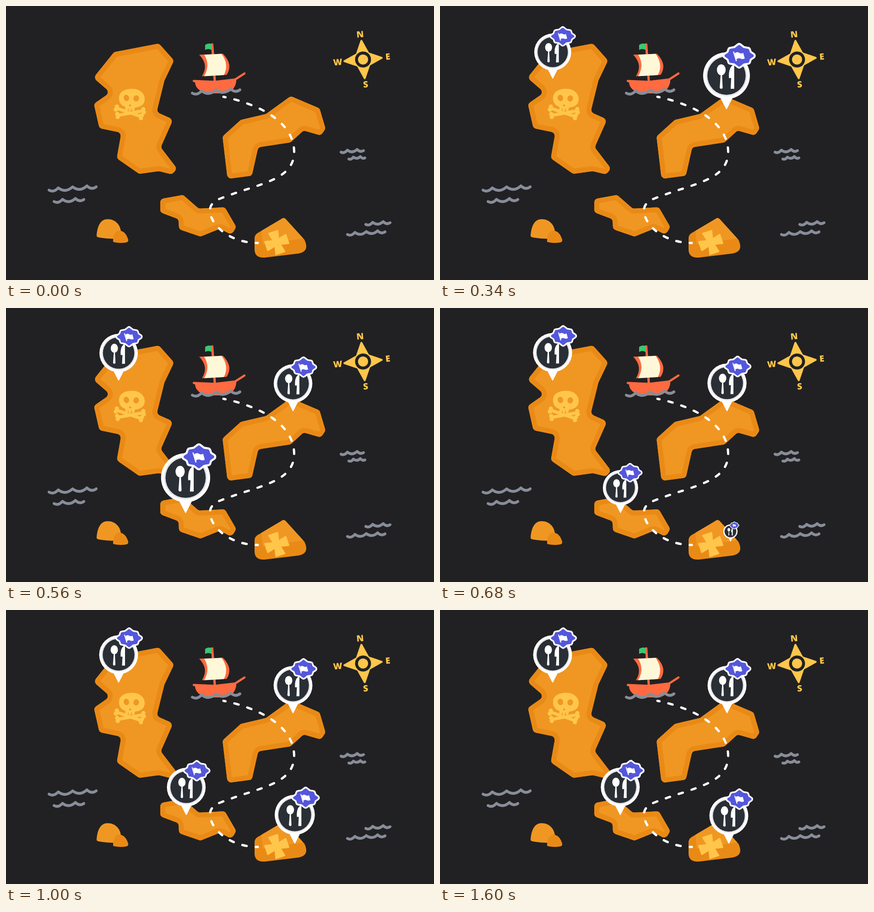
These frames come from a looping animation (935 px wide and 599 px high, 2400 ms). An HTML page with a canvas:

```html
<!DOCTYPE html>
<html lang="en">
<head>
<meta charset="utf-8">
<title>Treasure map</title>
<style>
  html, body { margin: 0; width: 100%; height: 100%; overflow: hidden; background: #212123; }
  canvas { display: block; width: 935px; height: 599px; }
  svg { position: absolute; width: 0; height: 0; }
</style>
</head>
<body>
<canvas id="stage" width="935" height="599"></canvas>
<svg><path id="route" d="M475 198.5 C537 211 628 246 629.5 318 C630 382 551 388 468 421 C453 427 444 436 446 450 C448 480 490 518 550 518"/></svg>
<script>
const W = 935, H = 599, LOOP = 2400, STEP = 20, TAU = Math.PI * 2;
const BG = '#212123', EDGE = '#ea8a16', LAND = '#f09723', GOLD = '#ffc64b', SEA = '#878d99',
      RED = '#ff6a40', CREAM = '#fff8d8', GREEN = '#3cc671', BADGE = '#5457db', PLATE = '#2a2f36';

const stage = document.getElementById('stage').getContext('2d');
let ctx = stage;

const asPath = d => typeof d === 'string' ? new Path2D(d) : d;

function fill(d, color) {
  ctx.fillStyle = color;
  ctx.fill(asPath(d));
}

function line(d, color, width) {
  ctx.strokeStyle = color;
  ctx.lineWidth = width;
  ctx.lineCap = ctx.lineJoin = 'round';
  ctx.stroke(asPath(d));
}

function oval(x, y, rx, ry, color, turn = 0) {
  const p = new Path2D();
  p.ellipse(x, y, rx, ry, turn, 0, TAU);
  fill(p, color);
}

// Run draw() with the origin moved to x, y and turned
function at(x, y, turn, draw) {
  ctx.save();
  ctx.translate(x, y);
  ctx.rotate(turn);
  draw();
  ctx.restore();
}

function inside(shape, draw) {
  ctx.save();
  ctx.clip(asPath(shape));
  draw();
  ctx.restore();
}

function roundPoly(pts, r) {
  const p = new Path2D();
  const mid = (a, b) => [(a[0] + b[0]) / 2, (a[1] + b[1]) / 2];
  p.moveTo(...mid(pts[pts.length - 1], pts[0]));
  pts.forEach((pt, i) => p.arcTo(...pt, ...mid(pt, pts[(i + 1) % pts.length]), r));
  p.closePath();
  return p;
}

// n points spread evenly by angle, radius given by index
const ring = (n, radius, sx = 1, sy = 1) => Array.from({ length: n }, (_, i) => {
  const a = i / n * TAU, r = radius(i);
  return [r * sx * Math.cos(a), r * sy * Math.sin(a)];
});

function island(corners) {
  const shape = roundPoly(corners.split(' ').map(c => c.split(',').map(Number)), 9);
  fill(shape, LAND);
  inside(shape, () => line(shape, EDGE, 22));
}

// n scallops, the outer two shorter, with lowered ends
function wave(x, y, width, n) {
  const END = 0.65, unit = width / (n - 2 + 2 * END);
  const p = new Path2D();
  let px = x, py = y + 3.5;
  p.moveTo(px, py);
  for (let i = 1; i <= n; i++) {
    const last = i === n;
    const nx = last ? x + width : x + (i - 1 + END) * unit;
    const ny = y - 0.07 * (nx - x) + (last ? 3.5 : 0);
    p.quadraticCurveTo((px + nx) / 2, (py + ny) / 2 + (nx - px) * 0.42, nx, ny);
    [px, py] = [nx, ny];
  }
  line(p, SEA, 6);
}

function bone() {
  line('M-27 0 H27', GOLD, 7);
  for (const x of [-29, 29]) for (const y of [-3.5, 3.5]) oval(x, y, 4.6, 4.6, GOLD);
}

function skull() {
  at(268.5, 232.5, 0.33, bone);
  at(272, 234, -0.18, bone);
  fill('M247 203 C246 188 259 181 276 181 C293 181 304 192 303 205 C302 216 294 221 282 222 L280 229 H260 L261 221 C250 217 247 209 247 203Z', GOLD);
  oval(263, 201, 6, 7, LAND, -0.3);
  oval(284.5, 202, 6.2, 6.8, LAND, 0.3);
  fill('M268 219 L271 214 L274 219Z', LAND);
  line('M267 225 V230 M274 225 V230', LAND, 1.6);
}

function ship() {
  line('M450.5 84 L456 163', RED, 5);
  fill('M435 85 Q442 80 449 83 V96 Q442 92 435 96Z', GREEN);
  fill('M422 106.5 L474 104.5 Q497 128 482 150.5 L428 153.5 Q444 129 422 106.5Z', RED);
  fill('M433 106.5 L471 104.5 Q488 128 476 151 L433 153.5 Q447 129 433 106.5Z', CREAM);
  line('M500 161 L521 147.5', RED, 4.6);
  fill('M410 161.5 L456 163.5 L499 158.5 Q504 158 503 165 Q500 186 478 191 H438 Q414 184 413 167 L409 166 Q406 163 410 161.5Z', RED);
  wave(407, 187, 104, 4);
}

function compass() {
  const star = roundPoly(ring(8, i => i % 2 ? 20 : 46), 2);
  at(780, 117, -0.09, () => {
    fill(star, GOLD);
    oval(0, 0, 17.5, 17.5, BG);
    oval(0, 0, 11, 11, GOLD);
  });

  ctx.font = '800 19px "Open Sans", sans-serif';
  ctx.textAlign = 'center';
  ctx.fillStyle = GOLD;
  [...'ESWN'].forEach((letter, i) => {
    const a = i * TAU / 4 - 0.11;
    at(779.5 + 55 * Math.cos(a), 116.5 + 55 * Math.sin(a), -0.09, () => ctx.fillText(letter, 0, 6.8));
  });
}

function treasure() {
  const land = 'M601 466 Q607 460 613 468 L652 511 Q664 536 640 541 L565 550 Q543 551 543 532 V508 Q543 499 552 495Z';
  fill(land, EDGE);
  inside(land, () => fill('M558 490 L607 455 L650 508 L561 521Z', LAND));
  const arm = new Path2D('M-4 2 L-10 -24 H10 L4 2Z');
  for (let i = 0; i < 4; i++) {
    at(591.5, 517, i * TAU / 4 - 0.33, () => {
      fill(arm, GOLD);
      line(arm, GOLD, 3);
    });
  }
}

// 20 equal gaps, starting and ending halfway through a dash
function trail() {
  const route = document.getElementById('route'), DASH = 9.6;
  const gap = route.getTotalLength() / 20 - DASH;
  ctx.setLineDash([DASH, gap]);
  ctx.lineDashOffset = DASH / 2;
  line(route.getAttribute('d'), '#fff', 5);
  ctx.setLineDash([]);
}

function drawMap() {
  ctx.fillStyle = BG;
  ctx.fillRect(0, 0, W, H);

  island('236,101 334,82 367,119 346,163 329,232 365,248 338,309 374,356 362,368 334,361 291,367 242,333 252,277 204,267 192,214 228,189 191,157');
  island('473,285 513,249 568,236 622,197 685,224 698,268 688,283 650,272 622,298 551,309 537,371 484,378');
  island('337,422 387,413 421,443 478,440 503,483 493,500 467,487 425,504 378,488 377,466 337,451');
  skull();

  fill('M198 501 C200 478 208 466 222 466 C238 466 249 477 251 492 L240 509 Q220 509 203 506 Q197 505 198 501Z', LAND);
  fill('M234 513 C234 500 239 491 248 491 C258 492 264 500 267 511 Q268 516 262 517 Q248 519 237 516.5 Q233 516 234 513Z', EDGE);

  treasure();
  trail();
  ship();
  compass();

  wave(94, 399, 103, 4);
  wave(105, 424, 65, 3);
  wave(732, 316, 49, 3);
  wave(749, 331, 35, 3);
  wave(786, 474, 53, 3);
  wave(746, 496, 82, 4);
}

const burst = roundPoly(ring(16, i => i % 2 ? 0.79 : i % 4 ? 0.92 : 1.06, 27, 19.3), 2.5);

// Drawn with its tip at 0, 0
function drawPin() {
  const tail = 'M-11 -23 L0 -1.5 L11 -23Z';
  fill(tail, '#fff');
  line(tail, '#fff', 2);
  oval(0, -61.3, 42.5, 42.5, '#fff');
  oval(0, -61.3, 37.5, 37.5, '#e6e5ea');
  oval(0, -61.3, 34.8, 34.8, PLATE);
  oval(-9.5, -72, 8, 10, '#fff');
  fill('M-10.5 -65 L-12.3 -40 Q-12 -37.5 -9.6 -37.5 Q-7 -37.5 -7 -40 L-8.2 -65Z', '#fff');
  fill('M14 -82 V-37.5 H7.5 L8.5 -57 H4.5 Q3 -77 14 -82Z', '#fff');
  at(23, -97.5, 0, () => {
    line(burst, '#fff', 7);
    fill(burst, BADGE);
    line('M-10 -6.8 L-5.2 9', '#fff', 2);
    fill('M-8.2 -4.5 Q-4 -8 0 -5.5 T7.3 -5.5 L10.2 5 Q6 7 2.5 5.2 T-5 6.5Z', '#fff');
  });
}

// Linear rise to full size, then a decaying spring
const RISE = 60, SWING = 250, AMP = 0.42, DECAY = 0.008;
const popSize = t => t < 0
  ? Math.max(0, 1 + t / RISE)
  : 1 + AMP * Math.sin(TAU * t / SWING) * Math.exp(-DECAY * t);

const pins = [
  { x: 246, y: 159, full: 120 },
  { x: 627, y: 226, full: 315 },
  { x: 393.8, y: 448.5, full: 517 },
  { x: 631, y: 511, full: 718 }
];
const PIVOT = 5.5; // middle of pin and badge together

const map = document.createElement('canvas');
map.width = W;
map.height = H;
ctx = map.getContext('2d');
drawMap();
ctx = stage;

function render(now) {
  const t = Math.floor(now % LOOP / STEP) * STEP;
  ctx.drawImage(map, 0, 0);
  for (const { x, y, full } of pins) {
    const size = popSize(t - full);
    if (size === 0) continue;
    at(x + PIVOT, y, 0, () => {
      ctx.scale(size, size);
      ctx.translate(-PIVOT, 0);
      drawPin();
    });
  }
}

let start;
function tick(now) {
  start ??= now;
  render(now - start);
  requestAnimationFrame(tick);
}
render(0);
requestAnimationFrame(tick);
</script>
</body>
</html>
```
